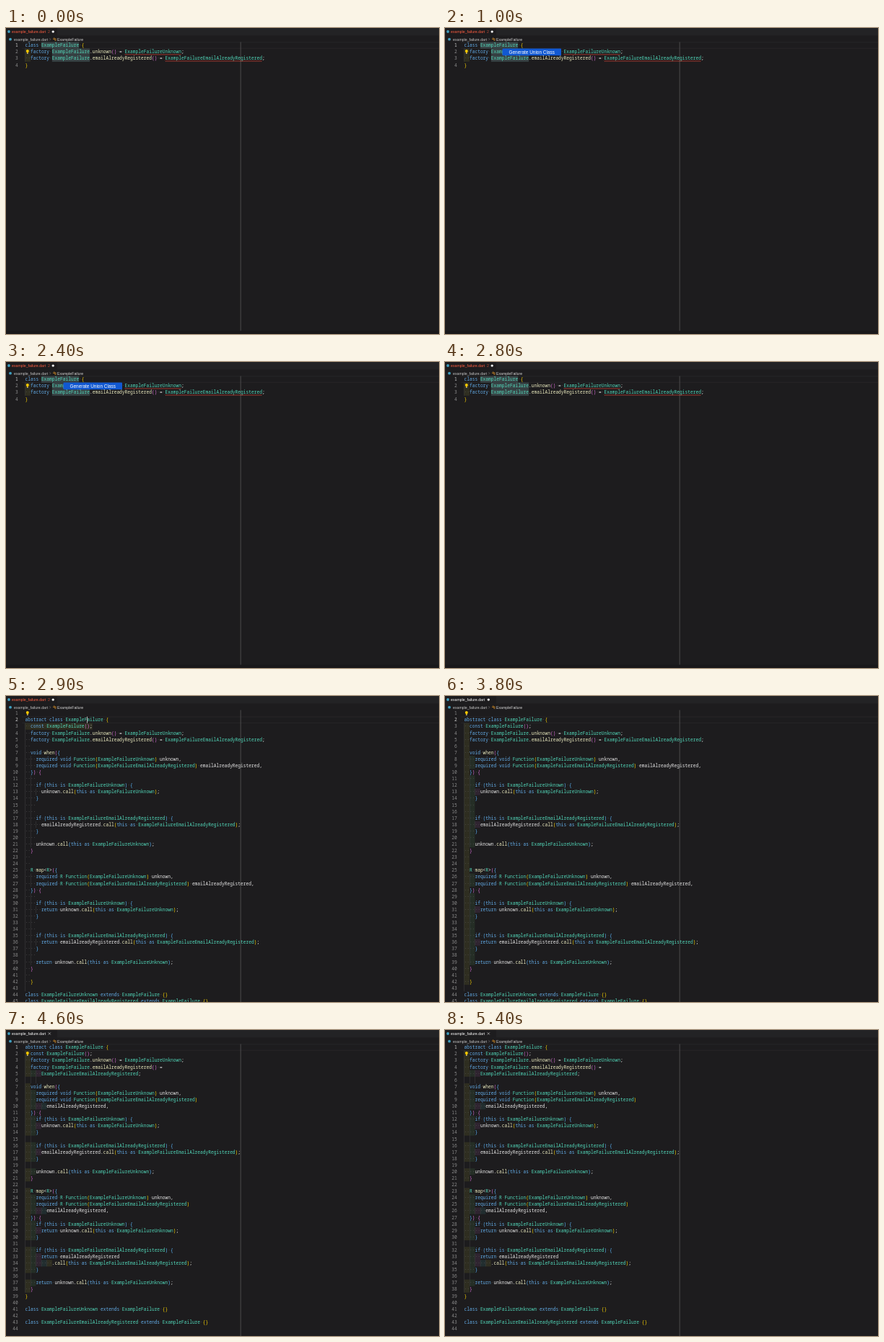
Write an HTML page with a canvas that moves like this. It is 600 px wide and 425 px high and loops after 5500 ms.

```html
<!DOCTYPE html>
<html lang="en">
<head>
<meta charset="utf-8">
<title>Generate union class</title>
<style>
  html, body { margin: 0; width: 100%; height: 100%; overflow: hidden; background: #1d1c1e; }
  canvas { display: block; width: 600px; height: 425px; }
</style>
</head>
<body>
<canvas id="stage"></canvas>
<script>
const LOOP = 5500, MENU_OPEN = 1000, MENU_CLOSE = 2500, GENERATED = 2900;
const ERRORS_CLEARED = 3300, FORMATTED = 3900, BULB_MOVED = 4300, BLINK = 500;
const LEFT = 26.5, CHAR = 3.732, TOP = 19.5, LINE = 9.086;
const SANS = '"Liberation Sans", Arial, sans-serif';
const MONO = '"Noto Sans Mono", "DejaVu Sans Mono", monospace';
const INDENTS = ['255,255,64', '127,255,127', '255,127,255', '79,236,236'];
const BRACKETS = ['#ffd700', '#da70d6', '#5cb8ff'];
const KEYWORDS = /^(abstract|class|const|factory|void|required|if|this|is|as|return|extends)$/;

const base = 'ExampleFailure', unknown = base + 'Unknown';
const email = 'emailAlreadyRegistered', registered = base + 'EmailAlreadyRegistered';

const before = `class ${base} {
  factory ${base}.unknown() = ${unknown};
  factory ${base}.${email}() = ${registered};
}`;

const generatedMethod = (head, type, ret) => `  ${head}({
    required ${type} Function(${unknown}) unknown,
    required ${type} Function(${registered}) ${email},
  }) {
    
    if (this is ${unknown}) {
      ${ret}unknown.call(this as ${unknown});
    }
    
    
    if (this is ${registered}) {
      ${ret}${email}.call(this as ${registered});
    }
    
    ${ret}unknown.call(this as ${unknown});
  }`;

const generated = `
abstract class ${base} {
  const ${base}();
  factory ${base}.unknown() = ${unknown};
  factory ${base}.${email}() = ${registered};
  
${generatedMethod('void when', 'void', '')}
  
  
${generatedMethod('R map<R>', 'R', 'return ')}
  
  }

class ${unknown} extends ${base} {}
class ${registered} extends ${base} {}`;

const formattedMethod = (head, type, ret, wrap) => `  ${head}({
    required ${type} Function(${unknown}) unknown,
    required ${type} Function(${registered})
        ${email},
  }) {
    if (this is ${unknown}) {
      ${ret}unknown.call(this as ${unknown});
    }

    if (this is ${registered}) {
      ${ret}${email}${wrap}.call(this as ${registered});
    }

    ${ret}unknown.call(this as ${unknown});
  }`;

const formatted = `abstract class ${base} {
  const ${base}();
  factory ${base}.unknown() = ${unknown};
  factory ${base}.${email}() =
      ${registered};

${formattedMethod('void when', 'void', '', '')}

${formattedMethod('R map<R>', 'R', 'return ', '\n          ')}
}

class ${unknown} extends ${base} {}

class ${registered} extends ${base} {}
`;

const stage = document.getElementById('stage');
const ratio = window.devicePixelRatio || 1;
stage.width = 600 * ratio;
stage.height = 425 * ratio;
const ctx = stage.getContext('2d');
ctx.scale(ratio, ratio);

const colX = col => LEFT + col * CHAR;
const lineY = line => TOP + (line - 1) * LINE;

function rect(x, y, w, h, color) {
  ctx.fillStyle = color;
  ctx.fillRect(x, y, w, h);
}

function dot(x, y, r, color) {
  ctx.fillStyle = color;
  ctx.beginPath();
  ctx.arc(x, y, r, 0, 7);
  ctx.fill();
}

function path(points, color, width) {
  ctx.strokeStyle = color;
  ctx.lineWidth = width;
  ctx.beginPath();
  points.forEach(([x, y]) => ctx.lineTo(x, y));
  ctx.stroke();
}

// Text is set large and scaled down to keep fractional glyph positions.
function text(str, x, y, size, color, family = SANS, align = 'left') {
  ctx.save();
  ctx.translate(x, y);
  ctx.scale(size / 20, size / 20);
  ctx.font = `500 20px ${family}`;
  ctx.textAlign = align;
  ctx.fillStyle = color;
  ctx.fillText(str, 0, 0);
  ctx.restore();
}

const code = (str, x, y, color, align) => text(str, x, y, CHAR / 0.6, color, MONO, align);

function tokenColor(token, next) {
  if (KEYWORDS.test(token)) return '#64aeea';
  if (/^[A-Z]/.test(token)) return '#52d8ba';
  if (/^\w/.test(token) && /[(<]/.test(next || '')) return '#ececc0';
  return '#e8e8e8';
}

// Tints the first indent levels, as many as tintedLevels, and marks spaces with dots.
function drawCode(source, current, tintedLevels) {
  let depth = 0, guides = 0;
  source.split('\n').forEach((row, i) => {
    const y = lineY(i + 1), baseline = y + 6.8;
    code(i + 1, 16.7, baseline, i + 1 === current ? '#d0d0d0' : '#8c8c8c', 'right');

    const indent = row.match(/^ */)[0].length;
    if (row) guides = indent;
    for (let col = 0; col < guides; col += 2) {
      if (col < indent && col / 2 < tintedLevels)
        rect(colX(col), y, 2 * CHAR, LINE, `rgba(${INDENTS[col / 2 % 4]},.08)`);
      rect(colX(col), y, 0.5, LINE, '#424242');
    }

    let col = 0;
    const tokens = row.match(/\w+|./g) || [];
    tokens.forEach((token, n) => {
      let color = tokenColor(token, tokens[n + 1]);
      if (/[)}]/.test(token)) depth--;
      if (/[(){}]/.test(token)) color = BRACKETS[depth % 3];
      if (/[({]/.test(token)) depth++;
      if (token === ' ') code('·', colX(col), baseline, '#555555');
      else code(token, colX(col), baseline, color);
      col += token.length;
    });
  });
}

function drawHeader(t) {
  const errors = t < ERRORS_CLEARED;
  rect(0, 0, 600, 10.5, '#232325');
  rect(0, 0, 71, 10.5, '#1d1c1e');
  dot(4, 5, 1.9, '#3f9fc0');
  text('example_failure.dart', 8, 6.9, 5.2, errors ? '#ff5e42' : '#ffffff');
  if (errors) text('2', 58, 6.9, 5.2, '#b84a38');
  if (t < FORMATTED) {
    dot(errors ? 65.2 : 60.3, 5.1, 1.7, '#eeeeee');
  } else {
    path([[58.7, 3.4], [61.9, 6.6]], '#e0e0e0', 0.6);
    path([[61.9, 3.4], [58.7, 6.6]], '#e0e0e0', 0.6);
  }
  dot(6, 15.7, 1.9, '#3f9fc0');
  text('example_failure.dart', 11, 17.7, 5.2, '#c4c4c4');
  path([[60.4, 14.1], [61.8, 15.7], [60.4, 17.3]], '#909090', 0.5);
  path([[65.3, 15], [66.8, 13.6], [67.6, 14.6], [66, 16], [65.3, 15]], '#ee9d28', 0.6);
  path([[66.8, 15.2], [69.4, 15.2], [69.4, 16.2]], '#ee9d28', 0.6);
  path([[67.8, 15.2], [67.8, 17.4], [69.6, 17.4]], '#ee9d28', 0.6);
  text(base, 71, 17.7, 5.2, '#d4d4d4');
}

function drawBulb(line) {
  const y = lineY(line) + 3.4;
  dot(29.8, y, 2, '#ffcc00');
  rect(28.9, y + 1.5, 1.8, 1.4, '#ffcc00');
  rect(28.9, y + 3.2, 1.8, 0.8, '#c8c8c8');
}

function squiggle(line, col, length) {
  const y = lineY(line) + 8.3, points = [];
  for (let x = 0; x <= length * CHAR; x++) points.push([colX(col) + x, y + (x % 2 ? 0.35 : -0.35)]);
  path(points, '#dc4638', 0.8);
}

function drawMenu() {
  ctx.fillStyle = '#1158d2';
  ctx.beginPath();
  ctx.roundRect(79.5, 28.6, 81.5, 9.6, 1);
  ctx.fill();
  text('Generate Union Class', 88.5, 35.7, 6.45, '#ffffff');
}

function draw(t) {
  const initial = t < GENERATED, done = t >= FORMATTED;
  const stale = !initial && t < ERRORS_CLEARED;
  const current = initial || done ? 1 : 2;
  rect(0, 0, 600, 425, '#1d1c1e');
  drawHeader(t);

  rect(22, lineY(current), 578, 0.8, '#29282a');
  rect(22, lineY(current) + LINE - 0.8, 578, 0.8, '#29282a');
  rect(324.7, TOP, 0.9, 425, '#505052');

  if (initial) {
    rect(0, 420.5, 600, 4.5, '#19181a');
    [6, 10, 10].forEach((col, i) =>
      rect(colX(col), lineY(i + 1), base.length * CHAR, LINE, '#384446'));
  }
  // Until the editor catches up, the old indent tint covers the inserted constructor.
  if (stale) rect(LEFT, lineY(3), 25 * CHAR, LINE, `rgba(${INDENTS[0]},.08)`);

  const tintedLevels = stale ? 0 : done && t < BULB_MOVED ? 2 : Infinity;
  drawCode(initial ? before : done ? formatted : generated, current, tintedLevels);
  if (initial) {
    squiggle(2, 37, unknown.length);
    squiggle(3, 52, registered.length);
  } else if (Math.floor((t - GENERATED) / BLINK) % 2 === 0) {
    rect(colX(23) - 0.3, lineY(current), 0.9, LINE, '#c8c8c8');
  }
  drawBulb(initial || t >= BULB_MOVED ? 2 : 1);
  if (t >= MENU_OPEN && t < MENU_CLOSE) drawMenu();
}

const start = performance.now();
function tick() {
  draw((performance.now() - start) % LOOP);
  requestAnimationFrame(tick);
}
tick();
</script>
</body>
</html>
```
